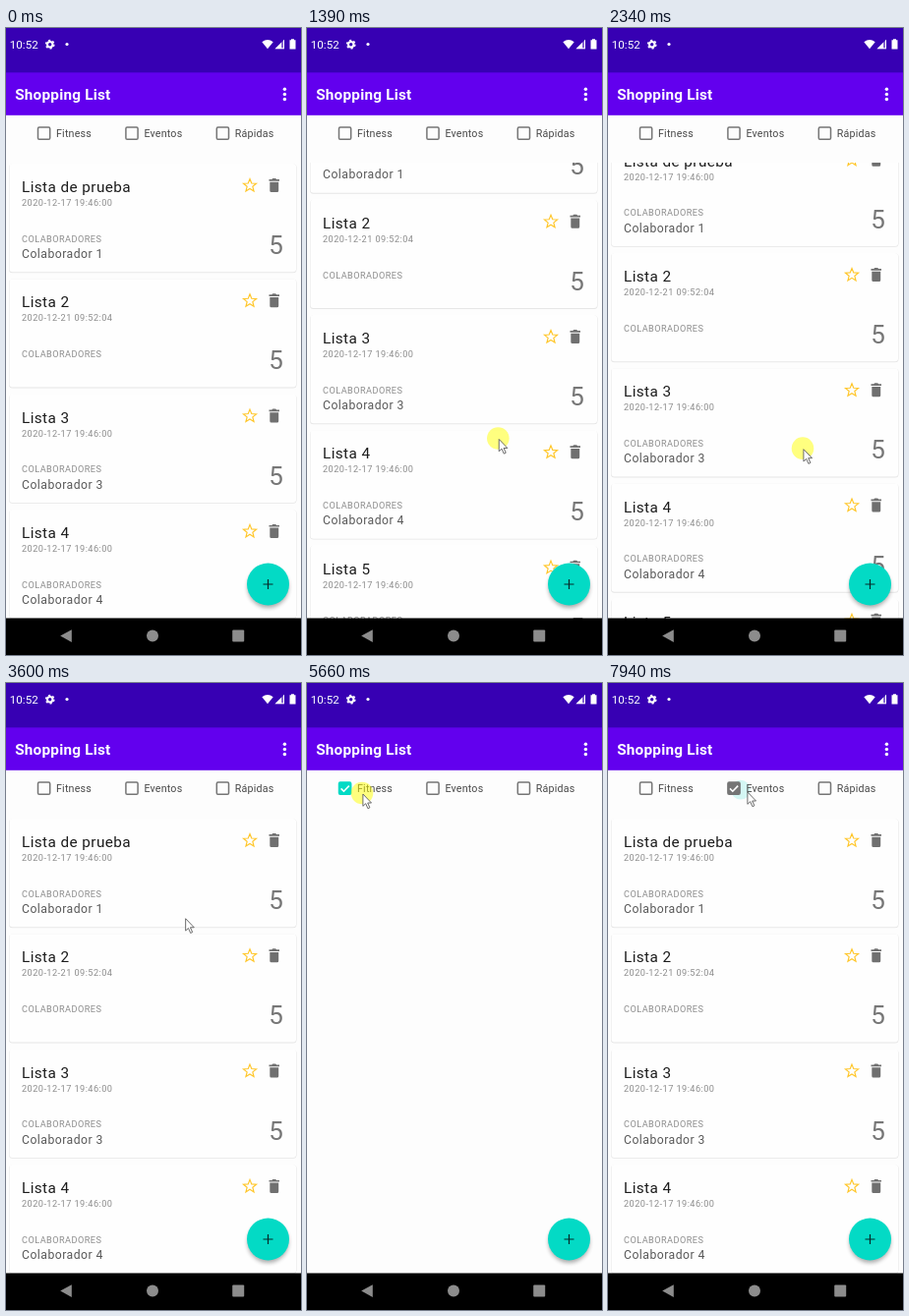
Recreate the animation shown at these times as an HTML page. Size 300 by 638 pixels, loop 8 s.

```html
<!DOCTYPE html>
<html lang="es">
<head>
<meta charset="utf-8">
<title>Shopping List</title>
<style>
  html, body { margin: 0; width: 100%; height: 100%; overflow: hidden; background: #fdfdfd; }
  svg { display: block; width: 100vw; height: 100vh; }
  text { font-family: Roboto, "Noto Sans", sans-serif; white-space: pre; }
  .bar { font-size: 15.3px; font-weight: 600; letter-spacing: .22px; fill: #fff; }
  .clock { font-size: 11.6px; fill: #fff; }
  .label { font-size: 10.7px; letter-spacing: .19px; fill: #484848; }
  .name { font-size: 15.3px; letter-spacing: .42px; fill: #1c1c1c; }
  .small { font-size: 9.17px; letter-spacing: .45px; fill: #8c8c8c; }
  .person { font-size: 12.2px; letter-spacing: .48px; fill: #585858; }
  .count { font-size: 26px; fill: #777; text-anchor: middle; }
</style>
</head>
<body>
<svg viewBox="0 0 300 638" preserveAspectRatio="none">
  <defs>
    <clipPath id="listClip"><rect y="137" width="300" height="464"/></clipPath>
    <filter id="blur" x="-30%" y="-30%" width="160%" height="160%"><feGaussianBlur stdDeviation="2"/></filter>
  </defs>
  <rect width="300" height="638" fill="#fdfdfd"/>

  <g clip-path="url(#listClip)">
    <g id="list"></g>
    <path id="topGlow" d="M0 137H300V146Q150 166 0 146Z" fill="#6200ee"/>
    <path id="bottomGlow" d="M0 601V598Q190 562 300 590V601Z" fill="#6200ee"/>
  </g>

  <rect width="300" height="46" fill="#3700b3"/>
  <rect y="45.3" width="300" height="43.5" fill="#6200ee"/>
  <text class="clock" x="3.8" y="21">10:52</text>
  <g fill="none" stroke="#fff">
    <circle cx="44.7" cy="16.7" r="2.7" stroke-width="2"/>
    <circle cx="44.7" cy="16.7" r="4.2" stroke-width="1.4" stroke-dasharray="2.2 2.2"/>
  </g>
  <g fill="#fff">
    <circle cx="62" cy="16.5" r="1.6"/>
    <path d="M260.3 14.2Q266 9.8 271.7 14.2L266 21.3Z"/>
    <path d="M273.5 21.2L283 11.7V21.2Z" opacity=".4"/>
    <path d="M273.5 21.2L280 14.7V21.2ZM282 12.7L283 11.7V21.2H273.5L274.5 20.2H282Z"/>
    <path d="M290 11.2H293V12.3H294.5V21.5H288.5V12.3H290Z"/>
    <circle cx="283.4" cy="62.3" r="1.7"/>
    <circle cx="283.4" cy="67.4" r="1.7"/>
    <circle cx="283.4" cy="72.5" r="1.7"/>
  </g>
  <text class="bar" x="9.2" y="73.1">Shopping List</text>

  <g id="filters"></g>

  <circle cx="266.5" cy="569" r="21" fill="#000" opacity=".32" filter="url(#blur)"/>
  <circle cx="266.5" cy="566" r="21.5" fill="#03dac5"/>
  <path d="M261.5 566H271.5M266.5 561V571" stroke="#062a28" stroke-width="1.2"/>

  <rect y="600.5" width="300" height="37.5" fill="#000"/>
  <g fill="#8c8c8c">
    <path d="M66.8 612.2V625L55.2 618.6Z"/>
    <circle cx="149" cy="618.5" r="6"/>
    <rect x="230.2" y="612.6" width="12" height="12" rx="1"/>
  </g>

  <g id="cursor">
    <circle id="press" r="11.3" fill="#ffff00" opacity=".5"/>
    <path transform="translate(.6 .7)" d="M.3 .3V12.6L3.1 10 5.3 15 7.3 14.1 5.1 9.3H8.9Z" fill="#fff" stroke="#5c5c5c" stroke-width=".9"/>
  </g>
</svg>

<script>
const LOOP = 8000, PITCH = 117.3, MAX_SCROLL = 98.5;
const $ = id => document.getElementById(id);
const clamp = (v, lo = 0, hi = 1) => Math.min(hi, Math.max(lo, v));
const ramp = (t, from, to) => clamp((t - from) / (to - from));
const within = (t, spans) => spans.some(([from, to]) => t >= from && t < to);

const starPoints = Array.from({ length: 10 }, (_, i) => {
  const r = i % 2 ? 3 : 6.9, a = (i / 5 - .5) * Math.PI;
  return `${248 + r * Math.cos(a)},${160.4 + r * Math.sin(a)}`;
}).join(" ");

function card(i) {
  const n = i + 1;
  const date = n === 2 ? "2020-12-21 09:52:04" : "2020-12-17 19:46:00";
  return `<g transform="translate(0 ${i * PITCH})">
    <rect x="3" y="138.3" width="292.5" height="110.9" rx="3.5" fill="#e6e6e6"/>
    <rect x="3.5" y="138" width="291.5" height="110.3" rx="3" fill="#fefefe"/>
    <text class="name" x="16" y="167">${n === 1 ? "Lista de prueba" : "Lista " + n}</text>
    <text class="small" x="16" y="181">${date}</text>
    <text class="small" x="16" y="217.8">COLABORADORES</text>
    ${n === 2 ? "" : `<text class="person" x="16" y="234">Colaborador ${n}</text>`}
    <text class="count" x="274.5" y="230">5</text>
    <polygon points="${starPoints}" fill="none" stroke="#ffc629" stroke-width="1.15"/>
    <path d="M267.5 154H270.3L271.2 153H274.2L275.1 154H278V155.7H267.5ZM268.3 156.7H277.2V165.5Q277.2 167 275.7 167H269.8Q268.3 167 268.3 165.5Z" fill="#707070"/>
  </g>`;
}
$("list").innerHTML = [0, 1, 2, 3, 4].map(card).join("");

// on/off: when the box is toggled; tap: where the pointer touches it
const filters = [
  { name: "Fitness", x: 38.6, on: 4640, off: 5880, tap: [56, 112] },
  { name: "Eventos", x: 128, on: 6750, off: 7860, tap: [141, 110] },
  { name: "Rápidas", x: 220.4 }
];
$("filters").innerHTML = filters.map(f => `<g>
  <circle class="ripple" fill="#03dac5" opacity="0"/>
  <rect class="box" x="${f.x - 6.1}" y="101.1" width="12.2" height="12.2" rx="1.3" stroke-width="1.5"/>
  <path class="tick" d="M${f.x - 4} 107.4l2.8 2.8 5.4-5.6" fill="none" stroke="#fff" stroke-width="1.6"/>
  <text class="label" x="${f.x + 12.4}" y="111.2">${f.name}</text>
</g>`).join("");
filters.forEach((f, i) => {
  const group = $("filters").children[i];
  for (const part of ["ripple", "box", "tick"]) f[part] = group.querySelector("." + part);
});

const cursorPath = [
  [210, -14, 470], [560, 192, 498], [760, 192, 498], [1080, 192, 457.5],
  [1880, 198, 354.5], [2060, 198, 354.5], [2350, 198, 430], [2560, 198, 475],
  [3130, 198, 473], [3370, 198, 271], [3520, 198, 271], [3600, 182, 239],
  [4080, 63, 117], [4240, 63, 117], [4400, 56, 112], [6000, 56, 112],
  [6500, 141, 110], [LOOP, 141, 110]
];
const presses = [[700, 2900], [4380, 4640], [5660, 5880], [6670, 6830], [7780, 7860]];

function cursorAt(t) {
  const i = Math.max(1, cursorPath.findIndex(k => k[0] >= t));
  const [t0, x0, y0] = cursorPath[i - 1], [t1, x1, y1] = cursorPath[i];
  const p = ramp(t, t0, t1);
  return [x0 + (x1 - x0) * p, y0 + (y1 - y0) * p];
}

// The finger overshoots the list end, so the way back starts from a new anchor.
function scrollAt(t, y) {
  if (t < 700 || t > 2900) return 0;
  return clamp((t < 1940 ? 498 : 454) - y, 0, MAX_SCROLL);
}

function drawFilter(f, t) {
  const checked = t >= f.on && t < f.off;
  const closing = t >= f.off && t < f.off + 180;
  const filled = checked || closing;
  const color = checked ? "#03dac5" : "#757575";
  f.box.setAttribute("fill", filled ? color : "none");
  f.box.setAttribute("stroke", color);
  f.tick.setAttribute("opacity", filled ? 1 : 0);
  if (!f.tap) return;
  const start = t >= f.off - 40 ? f.off : f.on;
  const age = t - start;
  const grow = ramp(age, -40, 220);
  f.ripple.setAttribute("cx", f.tap[0] + (f.x - f.tap[0]) * grow);
  f.ripple.setAttribute("cy", f.tap[1] + (107.2 - f.tap[1]) * grow);
  f.ripple.setAttribute("r", 5 + 10.5 * grow);
  f.ripple.setAttribute("opacity", .16 * ramp(age, -40, 40) * (1 - ramp(age, 200, 440)));
}

function draw(t) {
  const [x, y] = cursorAt(t);
  $("cursor").setAttribute("transform", `translate(${x} ${y})`);
  $("cursor").setAttribute("visibility", t < 210 ? "hidden" : "visible");
  $("press").setAttribute("visibility", t >= 210 && within(t, presses) ? "visible" : "hidden");

  const hidden = filters.reduce((sum, f) =>
    f.tap ? sum + ramp(t, f.on, f.on + 150) - ramp(t, f.off, f.off + 75) : sum, 0);
  $("list").setAttribute("transform", `translate(0 ${-scrollAt(t, y)})`);
  $("list").setAttribute("opacity", 1 - hidden);

  $("bottomGlow").setAttribute("opacity", .1 * ramp(t, 1530, 1860) * (1 - ramp(t, 2030, 2260)));
  $("topGlow").setAttribute("opacity", .08 * ramp(t, 2440, 2580) * (1 - ramp(t, 2620, 2900)));
  filters.forEach(f => drawFilter(f, t));
}

const begin = performance.now();
function tick() {
  draw((performance.now() - begin) % LOOP);
  requestAnimationFrame(tick);
}
tick();
</script>
</body>
</html>
```
